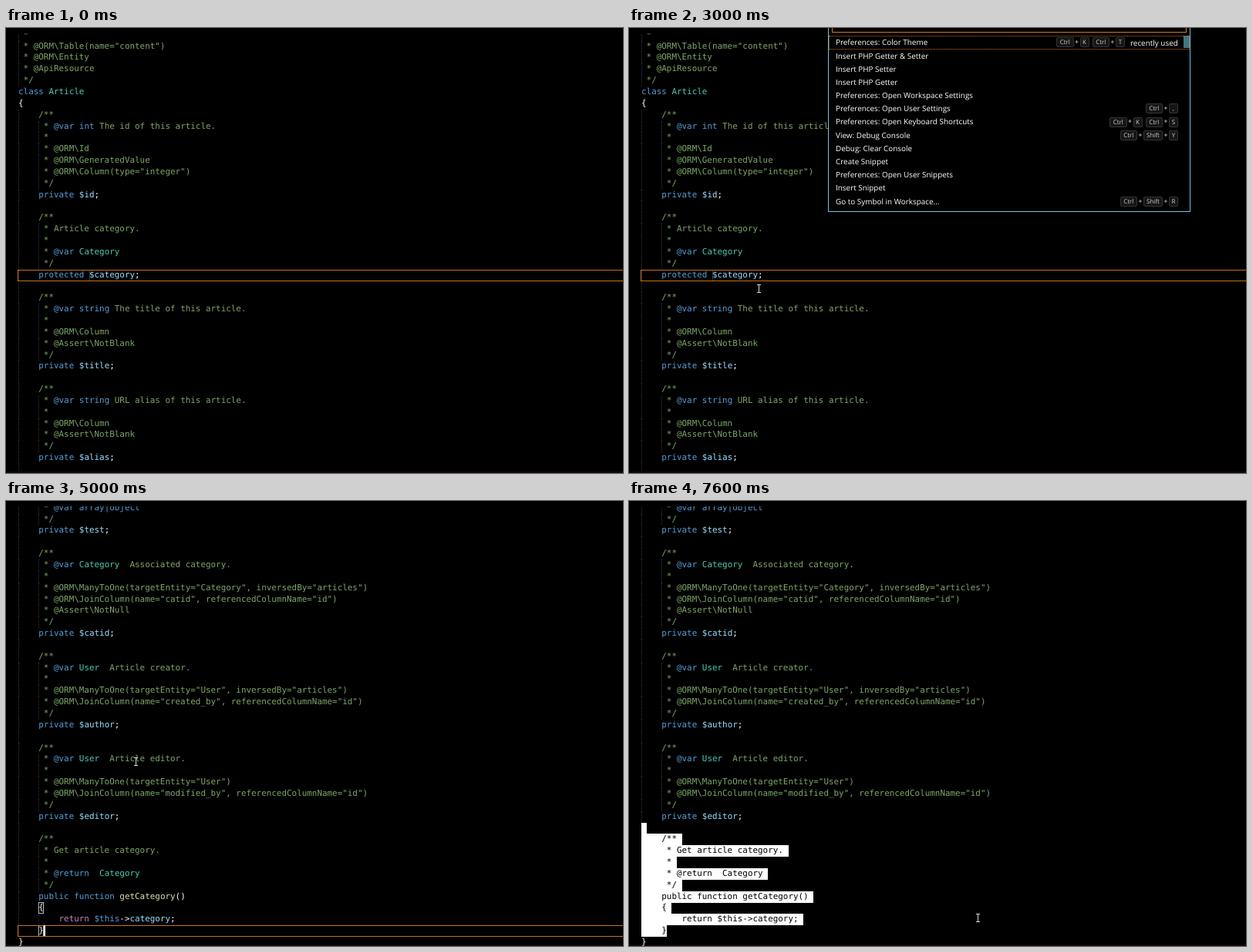
An HTML page for the animation above (8000 ms loop, 800 by 578 pixels).

```html
<!DOCTYPE html>
<html lang="en">
<head>
<meta charset="utf-8">
<title>Insert getter</title>
<style>
  html, body { margin: 0; width: 100%; height: 100%; overflow: hidden; background: #000; }
  #stage { position: relative; width: 800px; height: 578px; overflow: hidden; background: #000;
    text-rendering: geometricPrecision; }
  #stage div, #stage svg { position: absolute; box-sizing: border-box; white-space: pre; }
  #editor { left: 0; top: 0; width: 800px; height: 578px; clip-path: inset(7px 0 0 0);
    font: 10.915px/14.85px "DejaVu Sans Mono", monospace; color: #fff; }
  #edge { left: 0; top: 576px; width: 800px; height: 2px; background: #12060c; }
  .page { left: 0; top: 0; width: 800px; height: 578px; }
  .row { height: 14.85px; }
  .guide { width: 0; height: 14.85px; border-left: 1px dotted #343434; }
  .comment { color: #7ca668; }
  .key { color: #569cd6; }
  .type { color: #4ec9b0; }
  .var { color: #9cdcfe; }
  .func { color: #dcdcaa; }
  .flow { color: #c586c0; }
  #line { left: 15px; width: 790px; height: 15px; border: 1px solid #c8701c; }
  .match { height: 14.85px; border: 1px solid #b9b9b9; }
  #word { height: 13px; border-left: 1px solid #2c3c3c; }
  #word.hot { background: #20383c; }
  #caret { width: 2px; height: 14px; background: #fff; }
  .sel { height: 14.95px; background: #fff; color: #000; }
  #tip { left: 107.5px; top: 293px; width: 253px; height: 22px; background: #0a141c;
    border: 1px solid #4a8496; color: #b4bcbc; padding-left: 4px;
    font: 10.93px/20px "Open Sans", "Noto Sans", sans-serif; }
  #palette { left: 258px; top: -2px; width: 470px; height: 241px; background: #000;
    border: 1px solid #6fc3df; color: #fff;
    font: 9.92px/17.18px "Open Sans", "Noto Sans", sans-serif; }
  #input { left: 4px; top: -10px; width: 460px; height: 17px; border: 1px solid #d87818; }
  #thumb { left: 460px; top: 11px; width: 8px; height: 16px; background: #437585; }
  #pick { left: 0; width: 468px; height: 17.5px; border: 1px dotted #c8701c; }
  .item { left: 9px; height: 17.18px; }
  .keys { height: 17.18px; display: flex; align-items: center; }
  .keys b { box-sizing: border-box; height: 13px; border: 1px solid #333; border-radius: 2px;
    background: #161616; color: #ccc; font-weight: 400; font-size: 8px; line-height: 11px; text-align: center; }
  .keys i { width: 8px; font-style: normal; font-size: 8.5px; text-align: center; }
  .keys i.gap { width: 4px; }
</style>
</head>
<body>
<div id="stage">
  <div id="edge"></div>
  <div id="editor">
    <div id="word"></div>
    <div id="top" class="page"></div>
    <div id="bottom" class="page"></div>
    <div id="selection" class="page"></div>
    <div id="line"></div>
    <div id="caret"></div>
  </div>
  <div id="tip">protected AppBundle\Entity\Category $category</div>
  <div id="palette">
    <div id="input"></div>
    <div id="thumb"></div>
    <div id="pick"></div>
  </div>
  <svg id="mouse" width="9" height="13" viewBox="-4.5 -6.5 9 13" fill="none" stroke="#d8d8d8">
    <path d="M-2.5-5h5M0-5V5M-2.5 5h5"/>
  </svg>
</div>
<script>
const LOOP = 8000, X0 = 16, Y0 = 1.7, CH = 6.571, LH = 14.85;
const $ = id => document.getElementById(id);
const colX = c => X0 + c * CH;
const rowY = r => Y0 + r * LH;

const topCode = String.raw`
 *
 * @ORM\Table(name="content")
 * @ORM\Entity
 * @ApiResource
 */
class Article
{
    /**
     * @var int The id of this article.
     *
     * @ORM\Id
     * @ORM\GeneratedValue
     * @ORM\Column(type="integer")
     */
    private $id;

    /**
     * Article category.
     *
     * @var Category
     */
    protected $category;

    /**
     * @var string The title of this article.
     *
     * @ORM\Column
     * @Assert\NotBlank
     */
    private $title;

    /**
     * @var string URL alias of this article.
     *
     * @ORM\Column
     * @Assert\NotBlank
     */
    private $alias;`.slice(1).split("\n");

const bottomCode = String.raw`
     * @var array|object
     */
    private $test;

    /**
     * @var Category  Associated category.
     *
     * @ORM\ManyToOne(targetEntity="Category", inversedBy="articles")
     * @ORM\JoinColumn(name="catid", referencedColumnName="id")
     * @Assert\NotNull
     */
    private $catid;

    /**
     * @var User  Article creator.
     *
     * @ORM\ManyToOne(targetEntity="User", inversedBy="articles")
     * @ORM\JoinColumn(name="created_by", referencedColumnName="id")
     */
    private $author;

    /**
     * @var User  Article editor.
     *
     * @ORM\ManyToOne(targetEntity="User")
     * @ORM\JoinColumn(name="modified_by", referencedColumnName="id")
     */
    private $editor;

    /**
     * Get article category.
     *
     * @return  Category
     */
    public function getCategory()
    {
        return $this->category;
    }
}`.slice(1).split("\n");

function add(parent, cls, style = {}, text = "") {
  const el = document.createElement("div");
  el.className = cls;
  el.textContent = text;
  for (const key in style) el.style[key] = style[key] + "px";
  parent.append(el);
  return el;
}

const span = (cls, text) => `<span class="${cls}">${text}</span>`;

const kinds = [
  ["key", /^(class|private|protected|public|function|\$this)$/],
  ["flow", /^return$/], ["func", /^get/], ["type", /^[A-Z]/], ["var", /./]
];

function paint(line) {
  if (/^\s*(\/\*|\*)/.test(line)) {
    const tagged = line.replace(/(@var|@return)(\s+)([\w|]+)/, (_, tag, gap, type) =>
      span("key", tag) + gap + span(/^[A-Z]/.test(type) ? "type" : "key", type));
    return span("comment", tagged);
  }
  return line.replace(/\$?\w+/g, word => span(kinds.find(k => k[1].test(word))[0], word));
}

function buildPage(page, lines) {
  lines.forEach((line, r) => {
    const indent = line.search(/\S/);
    if (indent) add(page, "guide", { left: X0 - 0.5, top: rowY(r) });
    if (indent > 4) add(page, "guide", { left: colX(4), top: rowY(r) });
    add(page, "row", { left: X0, top: rowY(r) }).innerHTML = paint(line);
  });
}
buildPage($("top"), topCode);
add($("top"), "guide", { left: X0 - 0.5, top: rowY(38), height: 9 });
buildPage($("bottom"), bottomCode);
const matches = [35, 37].map(r =>
  add($("bottom"), "match", { left: colX(4) - 0.3, top: rowY(r), width: CH + 0.3 }));

const SEL_END = 37;
const selRows = [];
for (let r = 28; r <= SEL_END; r++) {
  const text = bottomCode[r];
  const width = (text.length + (r < SEL_END ? 1 : 0)) * CH;
  selRows.push([r, add($("selection"), "sel", { left: X0, top: rowY(r), width }, text)]);
}

Object.assign($("word").style,
  { left: colX(14) + "px", top: rowY(21) + 1 + "px", width: 9 * CH + "px" });

// Command list: label, then shortcut chords
const items = [
  ["Preferences: Color Theme", "Ctrl+K Ctrl+T"],
  ["Insert PHP Getter & Setter"], ["Insert PHP Setter"], ["Insert PHP Getter"],
  ["Preferences: Open Workspace Settings"],
  ["Preferences: Open User Settings", "Ctrl+,"],
  ["Preferences: Open Keyboard Shortcuts", "Ctrl+K Ctrl+S"],
  ["View: Debug Console", "Ctrl+Shift+Y"],
  ["Debug: Clear Console"], ["Create Snippet"],
  ["Preferences: Open User Snippets"], ["Insert Snippet"],
  ["Go to Symbol in Workspace...", "Ctrl+Shift+R"]
];
const itemY = i => 11.4 + i * 17.18;
const keyWidth = { Ctrl: 22.5, Shift: 25 };
const chord = keys => keys.split("+")
  .map(k => `<b style="width:${keyWidth[k] || 12}px">${k}</b>`).join("<i>+</i>");
items.forEach(([label, keys], i) => {
  add($("palette"), "item", { top: itemY(i) }, label);
  if (keys) add($("palette"), "keys", { top: itemY(i), right: i ? 15 : 84 }).innerHTML =
    keys.split(" ").map(chord).join('<i class="gap"></i>');
});
add($("palette"), "item", { left: 391, top: itemY(0) + 0.6 }, "recently used");

// Step tables: [start time, value]
const caretSteps = [[0, 0], [200, 1], [600, 0], [1200, 1], [1800, 0], [4400, 1],
  [5400, 0], [5800, 1], [6600, 0]];
const pickSteps = [[0, 0], [3400, 1], [3600, 2], [3800, 3]];
const selSteps = [[0, 99], [6600, 36], [6800, 32], [7000, 28]];
const mouseSteps = [[0, null], [200, [533, 514]], [400, [455, 470]], [600, [350, 412]],
  [800, [250, 365]], [1000, [186, 343]], [1200, [168, 338]], [5800, null],
  [6400, [52, 558]], [6600, [56, 543]], [6800, [66, 484]], [7000, [74, 425]],
  [7200, [270, 450]], [7400, [410, 512]], [7600, [452, 541]]];
const at = (steps, t) => steps.filter(s => s[0] <= t).pop()[1];
const show = (el, on) => { el.style.visibility = on ? "visible" : "hidden"; };

function render(time) {
  const t = Math.floor(time / 200) * 200;
  const inserted = t >= 5000;
  const hover = t >= 1400 && t < 2200;
  const open = t >= 2200 && t < 4400;
  const selFrom = at(selSteps, t);
  const selecting = selFrom < 99;
  const mouse = at(mouseSteps, t);

  show($("top"), !inserted);
  show($("bottom"), inserted);
  show($("word"), !inserted);
  $("word").className = hover ? "hot" : "";
  show($("tip"), hover);
  show($("palette"), open);
  $("pick").style.top = itemY(at(pickSteps, t)) + "px";

  show($("line"), !selecting);
  $("line").style.top = (inserted ? 551 : 314) + "px";
  show($("caret"), at(caretSteps, t));
  $("caret").style.left = colX(inserted ? 5 : 20) + "px";
  $("caret").style.top = rowY(inserted ? 37 : 21) + "px";
  matches.forEach(m => show(m, inserted && !selecting));
  selRows.forEach(([r, el]) => show(el, r >= selFrom));

  show($("mouse"), mouse);
  if (mouse) {
    $("mouse").style.left = mouse[0] - 4 + "px";
    $("mouse").style.top = mouse[1] - 6 + "px";
  }
}

const start = performance.now();
function tick() {
  render((performance.now() - start) % LOOP);
  requestAnimationFrame(tick);
}
tick();
</script>
</body>
</html>
```
